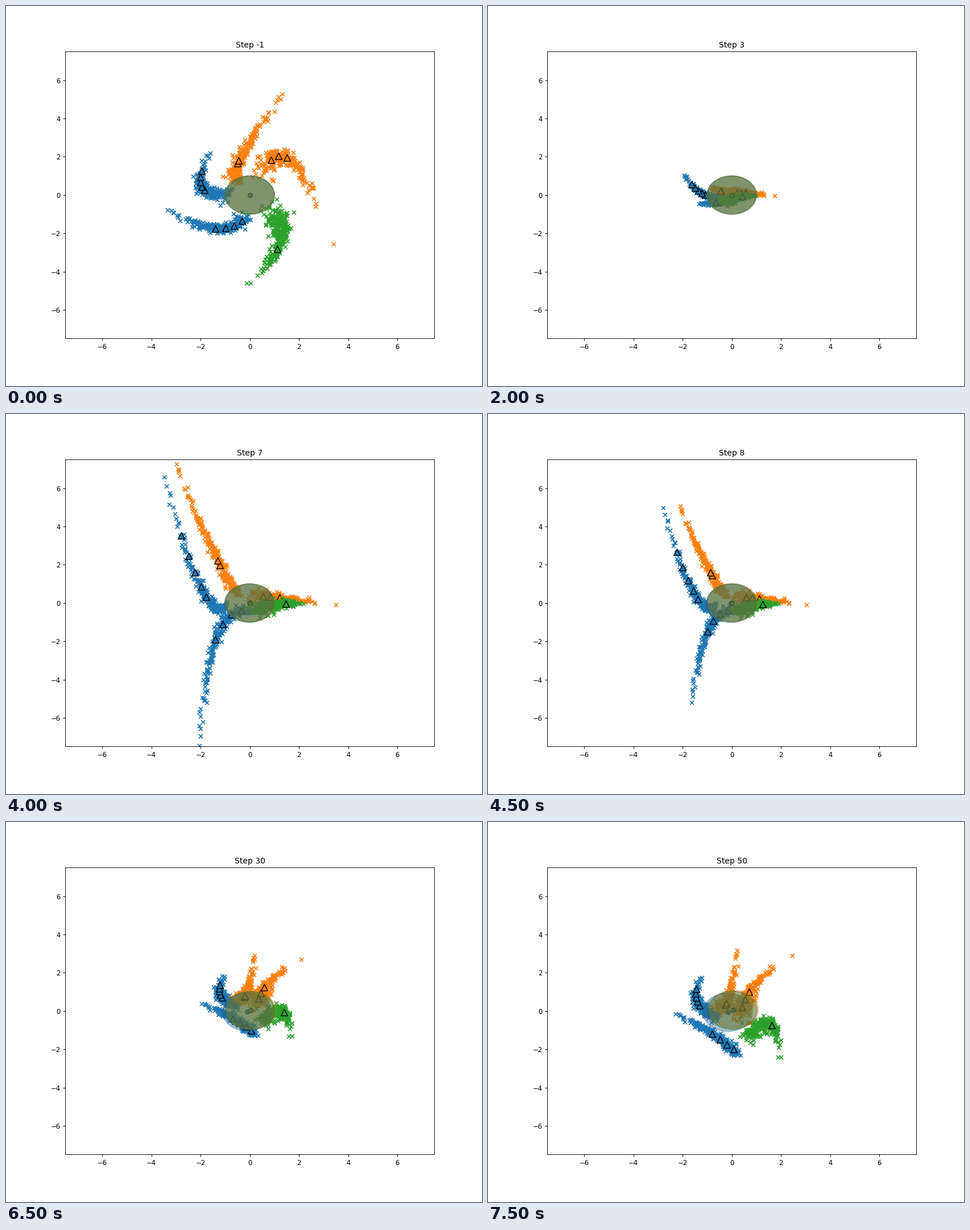
Write a matplotlib script that moves like this. It is 837 px wide and 669 px high and loops after 8 s.

```python
import matplotlib.pyplot as plt
import numpy as np
from matplotlib.animation import FuncAnimation
from matplotlib.patches import Ellipse

W, H, DPI = 837, 669, 83.7
FRAMES = 16
START, SQUEEZE, BURST, END = range(4)
SPREAD = np.array([0.16, 0.07, 0.12, 0.13])

# Key frame: pose, scale (x, y) and shift (x, y); frames between are blended.
KEYS = {
    0: (START, (1, 1), (0, 0)),
    1: (SQUEEZE, (1.05, 0.4), (-0.6, 0)),
    2: (SQUEEZE, (0.7, 0.4), (-0.4, 0)),
    3: (SQUEEZE, (0.6, 0.4), (-0.3, 0)),
    6: (SQUEEZE, (1, 1), (0, 0)),
    8: (BURST, (1, 1), (0, 0)),
    11: (SQUEEZE, (0.7, 1), (0.25, 0)),
    13: (END, (0.85, 0.75), (0, 0.5)),
    15: (END, (1, 1), (0, 0)),
}
rng = np.random.default_rng(5)


def parabola(t, ends):
    """Curve through three points at t = 0, 0.5 and 1."""
    basis = np.column_stack([(2 * t - 1) * (t - 1), 4 * t * (1 - t), t * (2 * t - 1)])
    return basis @ ends


class Strand:
    """Band of noisy points along a parabola that bends from pose to pose."""

    def __init__(self, poses, marks, width=1.0, n=210, strays=()):
        self.poses = np.array(poses, float)
        self.marks = np.linspace(*marks)
        self.width = width
        self.t = np.append(rng.beta(1.4, 2.1, n), [0.97, 1, *strays])
        self.noise = rng.normal(size=(len(self.t), 2))

    def key(self, frame):
        pose, scale, shift = KEYS[frame]
        return self.poses[pose] * scale + shift, SPREAD[pose] * self.width

    def at(self, frame):
        """Positions of the crosses and of the marked points."""
        a = max(k for k in KEYS if k <= frame)
        b = min(k for k in KEYS if k >= frame)
        w = (frame - a) / max(b - a, 1)
        (ends_a, s_a), (ends_b, s_b) = self.key(a), self.key(b)
        ends = ends_a + (ends_b - ends_a) * w
        spread = s_a + (s_b - s_a) * w
        fade = np.clip(1.1 - 0.8 * self.t, 0.2, 1)[:, None]
        return parabola(self.t, ends) + self.noise * spread * fade, parabola(self.marks, ends)


class Group:
    """One colour: its strands, triangles, centre dot and translucent disc."""

    def __init__(self, color, disc, drift, strands, z):
        self.strands, self.drift = strands, np.array(drift)
        self.crosses = ax.scatter([], [], marker="x", c=color, zorder=1 + 0.2 * z)
        self.triangles = ax.scatter([], [], s=100, marker="^", facecolor=color,
                                    edgecolor="black", linewidth=1.2, zorder=1.1 + 0.2 * z)
        self.dot = ax.scatter([], [], s=40, facecolor=color, edgecolor="black",
                              linewidth=1, zorder=1.7 + 0.05 * z)
        self.disc = ax.add_patch(Ellipse((0, 0), 2, 2, color=disc, alpha=0.38,
                                         linewidth=1.5, zorder=2 + 0.05 * z))

    def move(self, frame):
        crosses, marks = zip(*(s.at(frame) for s in self.strands))
        self.crosses.set_offsets(np.vstack(crosses))
        self.triangles.set_offsets(np.vstack(marks))
        center = self.drift * (frame / (FRAMES - 1)) ** 3
        self.dot.set_offsets([center])
        self.disc.set_center(center)


fig = plt.figure(figsize=((W + 1e-6) / DPI, (H + 1e-6) / DPI), dpi=DPI, facecolor="white")
ax = fig.add_axes([104 / W, 0.125, 649.3 / W, 0.755])
ax.set(xlim=(-7.5, 7.5), ylim=(-7.5, 7.5))
title = ax.set_title("")

upper_blue = Strand([
    [(-0.8, 0), (-1.95, 0.45), (-1.65, 2.2)],
    [(-0.5, -0.2), (-1.4, 0.2), (-2.4, 1.75)],
    [(-1.0, -0.2), (-2.0, 0.9), (-3.5, 6.6)],
    [(-0.55, -0.4), (-1.4, 0.5), (-1.25, 1.75)],
], marks=(0.4, 0.78, 5), width=1.2)
lower_blue = Strand([
    [(-0.1, -1.05), (-1.4, -1.75), (-3.3, -0.7)],
    [(0.1, -0.3), (-0.6, -0.65), (-1.5, -0.7)],
    [(0, -0.4), (-1.4, -1.9), (-2.0, -7.4)],
    [(0.25, -2.2), (-0.8, -1.2), (-2.25, -0.1)],
], marks=(0.1, 0.5, 4))
left_orange = Strand([
    [(-0.6, 0.7), (-0.25, 2.3), (1.3, 5.2)],
    [(0, 0.15), (-0.45, 0.4), (-0.85, 0.65)],
    [(-0.5, 0.4), (-1.6, 3.0), (-3.0, 7.2)],
    [(-0.5, 0.2), (-0.15, 0.7), (0.2, 3.1)],
], marks=(0.34, 0.38, 2))
right_orange = Strand([
    [(0.5, 1.1), (1.5, 1.95), (2.75, -0.6)],
    [(0.3, 0.2), (1.05, 0.18), (2.1, 0.03)],
    [(0.2, 0.35), (1.2, 0.28), (2.7, 0.03)],
    [(0.4, -0.3), (0.7, 1.0), (1.75, 2.35)],
], marks=(0.2, 0.5, 3), width=1.4, strays=[1.2])
green = Strand([
    [(0.85, -0.7), (1.25, -2.3), (0.3, -4.2)],
    [(-0.2, -0.6), (0.6, -0.2), (1.4, -0.05)],
    [(0.1, -0.4), (1.2, -0.07), (2.0, -0.02)],
    [(0.6, -1.6), (1.45, -0.6), (1.9, -1.9)],
], marks=(0.65, 0.65, 1), width=1.4, n=260, strays=[1.1, 1.1])

groups = [
    Group("tab:blue", "#1f5a96", (-0.16, -0.06), [upper_blue, lower_blue], 0),
    Group("tab:orange", "#dc7828", (0.08, 0.07), [left_orange, right_orange], 1),
    Group("tab:green", "#1e7832", (0.02, 0.04), [green], 2),
]


def update(frame):
    # Single steps up to 10, then every tenth.
    step = frame - 1 if frame < 12 else (frame - 10) * 10
    title.set_text(f"Step {step}")
    for group in groups:
        group.move(frame)
    return []


anim = FuncAnimation(fig, update, frames=FRAMES, interval=500,
                     repeat=True, repeat_delay=0, blit=False)
plt.show()
```
